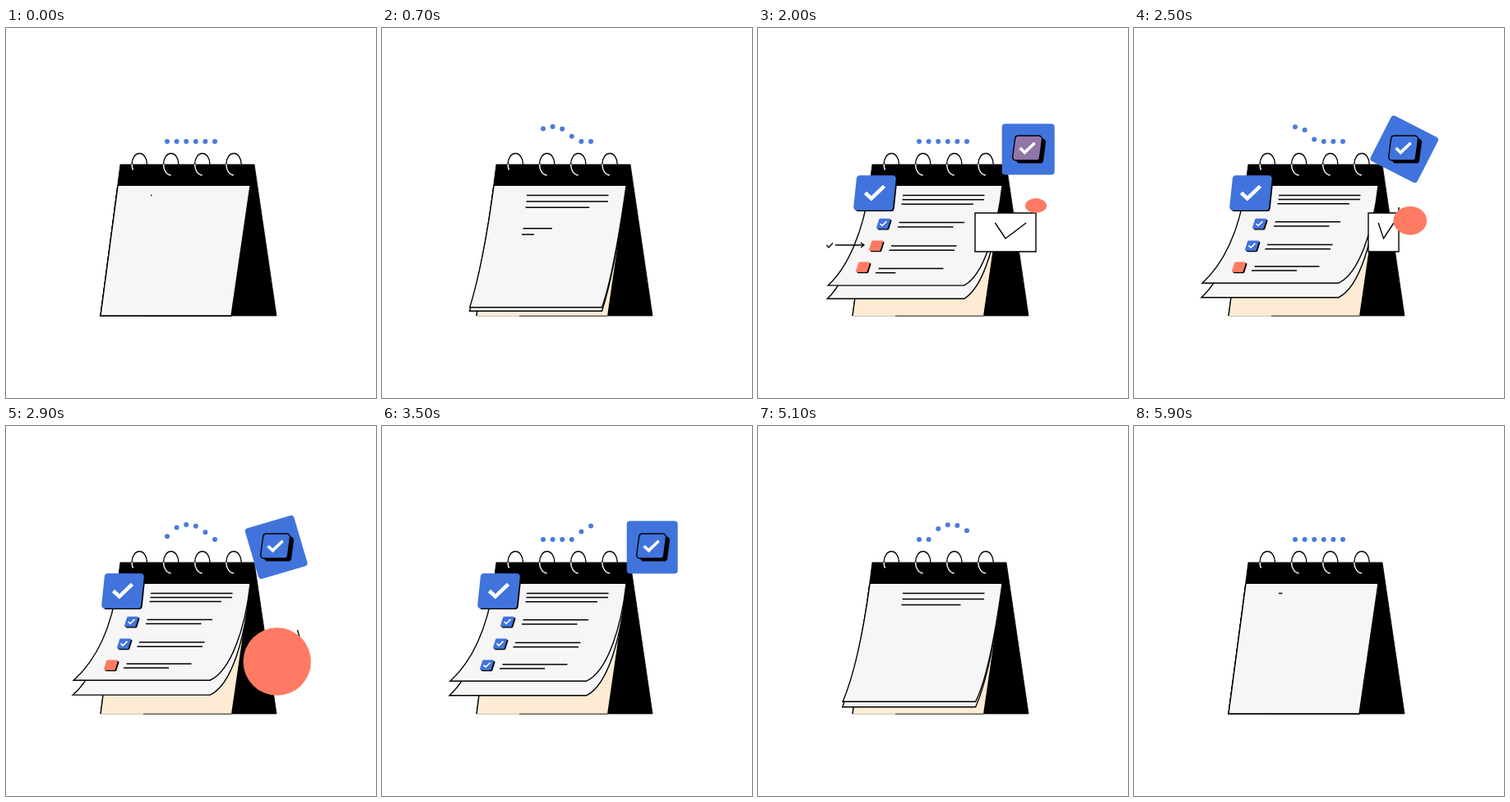
An HTML page with a canvas that plays this animation: 450x450 px, repeating every 6 s.

```html
<!DOCTYPE html>
<html lang="en">
<head>
<meta charset="utf-8">
<title>Calendar checklist</title>
<style>
html, body { margin: 0; width: 100%; height: 100%; overflow: hidden; background: #fff; }
canvas { display: block; width: 450px; height: 450px; }
</style>
</head>
<body>
<canvas id="stage"></canvas>
<script>
const LOOP = 6000, STEP = 100;
const BLACK = '#000', WHITE = '#fff', PAPER = '#f6f6f6', CREAM = '#fdebd3';
const BLUE = [64, 115, 220], RED = [254, 122, 99], DOT = '#4b7cdc';
const canvas = document.getElementById('stage');
const ratio = window.devicePixelRatio || 1;
canvas.width = canvas.height = 450 * ratio;
const ctx = canvas.getContext('2d');

const clamp = x => Math.max(0, Math.min(1, x));
const lerp = (a, b, k) => a + (b - a) * k;
const ramp = (t, start, length) => clamp((t - start) / length);
const smooth = x => x * x * (3 - 2 * x);
const rgb = c => `rgb(${c.map(Math.round).join()})`;
const mix = (a, b, k) => rgb(a.map((v, i) => lerp(v, b[i], k)));

function pop(x) {
  const y = x - 1;
  return x <= 0 ? 0 : 1 + 2.4 * y * y * y + 1.4 * y * y;
}

function keyed(x, keys) {
  const i = Math.max(1, keys.findIndex(k => k[0] >= x));
  const [x0, y0] = keys[i - 1], [x1, y1] = keys[i];
  return lerp(y0, y1, (x - x0) / (x1 - x0));
}

function paint(fill, stroke, width = 1.4) {
  if (fill) { ctx.fillStyle = fill; ctx.fill(); }
  if (stroke) { ctx.strokeStyle = stroke; ctx.lineWidth = width; ctx.stroke(); }
}

function path(points, closed) {
  ctx.beginPath();
  points.forEach(([x, y]) => ctx.lineTo(x, y));
  if (closed) ctx.closePath();
}

function oval(x, y, rx, ry, fill) {
  ctx.beginPath();
  ctx.ellipse(x, y, rx, ry, 0, 0, Math.PI * 2);
  paint(fill);
}

function rounded(points, r) {
  const [a, b] = points;
  ctx.beginPath();
  ctx.moveTo((a[0] + b[0]) / 2, (a[1] + b[1]) / 2);
  for (let i = 1; i <= 4; i++) {
    const p = points[i % 4], q = points[(i + 1) % 4];
    ctx.arcTo(p[0], p[1], q[0], q[1], r);
  }
  ctx.closePath();
}

function checkbox(x, y, w, h, skew, scale, color, o) {
  if (scale <= 0.02) return;
  const shape = (dx, dy) => rounded([
    [-w / 2 + skew / 2 + dx, -h / 2 + dy], [w / 2 + skew / 2 + dx, -h / 2 + dy],
    [w / 2 - skew / 2 + dx, h / 2 + dy], [-w / 2 - skew / 2 + dx, h / 2 + dy]
  ], o.radius);
  ctx.save();
  ctx.translate(x, y);
  ctx.scale(scale, scale);
  shape(o.depth, o.depth * 0.8);
  paint(BLACK);
  shape(0, 0);
  paint(color, o.outline && BLACK, 1.4);
  if (o.check > 0) {
    const s = o.checkSize;
    ctx.globalAlpha = o.check;
    path([[-s, 0], [-s * 0.36, s * 0.6], [s, -s * 0.7]]);
    paint(null, WHITE, s * 0.4);
  }
  ctx.restore();
}

const LIFT = [[0, 0], [100, 0], [200, 0.02], [400, 0.07], [700, 0.25], [900, 0.36],
  [1200, 0.63], [1400, 0.73], [1900, 0.865], [2000, 0.9], [2500, 0.97], [3000, 1]];

function page(p, tipX, y, endX, bend, fill) {
  const leftC1 = [lerp(129, 128, p), lerp(245, 248, p)];
  const leftC2 = [lerp(122, 108, p), lerp(297, y - 23, p)];
  const rightC1 = [lerp(289, 291, p), lerp(245, 245 + bend, p)];
  const rightC2 = [lerp(282, 274, p), lerp(297, y - 12, p)];
  ctx.beginPath();
  ctx.moveTo(136, 192);
  ctx.bezierCurveTo(...leftC1, ...leftC2, tipX, y);
  ctx.lineTo(endX, y);
  ctx.bezierCurveTo(...rightC2, ...rightC1, 297, 192);
  paint(fill, BLACK, 1.4);
}

function calendar(p) {
  path([[139, 166], [302, 166], [329, 350], [115, 350]], true);
  paint(BLACK, BLACK, 0.8);
  path([[136, 192], [297, 192], [274, 350.6], [115, 350.6]], true);
  paint(CREAM);
  path([[136, 192], [115, 350]]);
  paint(null, BLACK, 1.4);
  path([[167, 350.2], [274, 350.2]]);
  paint(null, BLACK, 0.8);
  page(p, 115 - 34 * p, 350 - 23 * p, 274 - 26 * p, 15, PAPER);
  page(p, 115 - 33 * p, 350 - 41 * p, 274 - 26 * p, 0, PAPER);
  path([[139, 166], [302, 166], [298, 192], [136, 192]], true);
  paint(BLACK);
}

function rings() {
  [162.3, 200.7, 238.8, 277].forEach((x, i) => {
    const start = i ? Math.PI / 2 : Math.PI * 0.82;
    ctx.beginPath();
    ctx.ellipse(x, 165.7, 9.2, 13.2, 0, start, Math.PI);
    paint(null, WHITE);
    ctx.beginPath();
    ctx.ellipse(x, 165.7, 9.2, 13.2, 0, Math.PI, Math.PI * 2);
    paint(null, BLACK);
  });
}

function dots(t) {
  for (let i = 0; i < 6; i++) {
    const u = ramp(t % 2000, 157 + 167 * i, 760);
    const lift = 18 * Math.pow(Math.max(0, Math.sin(Math.PI * u)), 0.6);
    oval(196 + 11.6 * i, 138 - lift, 3, 3, DOT);
  }
}

// Each line: left, right, group, row, time it grows, time it retracts
const LINES = [
  [176, 275.5, 0, 0, 0, 5470], [175.5, 275, 0, 1, 150, 5250], [174.5, 262, 0, 2, 300, 5020],
  [171.5, 251, 1, 0, 500, 4600], [170, 237.5, 1, 1, 600, 4500],
  [162, 241.5, 2, 0, 750, 4300], [159.5, 239, 2, 1, 850, 4200],
  [146.5, 225.5, 3, 0, 1250, 3950], [143, 198, 3, 1, 1800, 3600]
];

function writing(t, p) {
  const tops = [203.5, 246.5 - 11 * p, 282 - 19 * p, 323 - 34 * p];
  for (const [x0, x1, group, row, grow, shrink] of LINES) {
    const k = ramp(t, grow, 450) - ramp(t, shrink, 450);
    if (k === 0 && grow > 0) continue;
    const y = tops[group] + row * (8.2 - 3.2 * p);
    path([[x0, y], [Math.max(x0 + 1.5, lerp(x0, x1, k)), y]]);
    paint(null, BLACK, 1.5);
  }
}

function checklist(t) {
  const items = [
    { from: [130, 243], to: [152.5, 238], grow: 1000, shrink: 4000, done: 0 },
    { from: [123, 270], to: [143.5, 264.7], grow: 1150, shrink: 3750, done: 2100 },
    { from: [117, 297], to: [127.5, 290.8], grow: 1300, shrink: 3625, done: 3000 }
  ];
  for (const { from, to, grow, shrink, done } of items) {
    const s = ramp(t, grow, 500) - ramp(t, shrink, 500);
    const k = ramp(t, done, 300);
    checkbox(lerp(from[0], to[0], s), lerp(from[1], to[1], s), 14, 12.5, 4, s,
      mix(RED, BLUE, k), { radius: 1.5, depth: 1.5, check: k * ramp(s, 0.8, 0.2), checkSize: 4 });
  }
  const big = pop(ramp(t, 700, 400)) * (1 - smooth(ramp(t, 3600, 400)));
  checkbox(142, 200.5, 48, 42.5, 4.5, big, rgb(BLUE),
    { radius: 4, depth: 1.6, check: 1, checkSize: 11.5 });
}

function arrow(t) {
  const show = ramp(t, 1700, 300), hide = ramp(t, 2100, 300);
  if (!show || hide === 1) return;
  const tail = lerp(94, 129, hide), head = lerp(94, 129, show);
  if (hide < 0.4) {
    path([[83.5, 264], [86, 267], [91, 261.5]]);
    paint(null, BLACK, 1.3);
  }
  path([[tail, 264], [head, 264]]);
  paint(null, BLACK, 1.3);
  path([[head - 4, 261], [head, 264], [head - 4, 267]]);
  paint(null, BLACK, 1.3);
}

function tile(t) {
  const s = pop(ramp(t, 1250, 500)) * (1 - smooth(ramp(t, 3600, 400)));
  if (s <= 0.02) return;
  const turn = smooth(ramp(t, 2100, 1100)) * Math.PI / 2;
  ctx.save();
  ctx.translate(328.7, 147.4);
  ctx.scale(s, s);
  ctx.rotate(turn);
  rounded([[-32, -31], [32, -31], [32, 31], [-32, 31]], 4);
  paint(rgb(BLUE));
  ctx.restore();
  checkbox(lerp(328.7, 327.6, s), lerp(147.4, 146, s), 33, 30, 4, s,
    mix(RED, BLUE, ramp(t, 1800, 350)),
    { radius: 4, depth: 4.5, outline: true, check: 1, checkSize: 9 });
}

function envelope(t) {
  const k = smooth(ramp(t, 1100, 450)) * (1 - smooth(ramp(t, 2300, 400)));
  if (k <= 0.01) return;
  const open = ramp(t, 1200, 500);
  const x = lerp(306, 301, k), half = 37 * k;
  path([[x - half, 225], [x + half, 225], [x + half, 272], [x - half, 272]], true);
  paint(WHITE, BLACK, 1.4);
  const reach = lerp(1, 0.68, open), top = lerp(224, 237, open);
  path([[x - half * reach * lerp(1, 0.5, open), top], [x, lerp(228.5, 256, open)],
    [x + half * reach, top]]);
  paint(null, BLACK, 1.4);
  path([[x + half, 225], [x + half, lerp(225, 218, open)]]);
  paint(null, BLACK, 1.4);
}

function badge(t) {
  const grow = ramp(t, 1850, 150);
  const move = smooth(ramp(t, 2300, 600));
  const burst = smooth(ramp(t, 2900, 150));
  const fade = 1 - smooth(ramp(t, 3100, 400));
  if (!grow || !fade) return;
  if (t >= 2800 && t < 3200) {
    path([[354.5, 248], [357, 257]]);
    paint(null, BLACK, 1.3);
  }
  const x = lerp(338, 329.7, move), y = lerp(216, 286.5, move);
  const swell = 8 * burst;
  oval(x, y, (lerp(13 * grow, 41.2, move) + swell) * fade,
    (lerp(9 * grow, 41.2, move) + swell) * fade, rgb(RED));
}

function draw(t) {
  ctx.setTransform(ratio, 0, 0, ratio, 0, 0);
  ctx.fillStyle = WHITE;
  ctx.fillRect(0, 0, 450, 450);
  const p = keyed(Math.min(t, LOOP - t), LIFT);
  calendar(p);
  rings();
  dots(t);
  writing(t, p);
  checklist(t);
  arrow(t);
  tile(t);
  envelope(t);
  badge(t);
}

const begin = performance.now();
function tick() {
  const elapsed = Math.max(0, performance.now() - begin) % LOOP;
  draw(Math.floor(elapsed / STEP) * STEP);
  requestAnimationFrame(tick);
}
tick();
</script>
</body>
</html>
```
